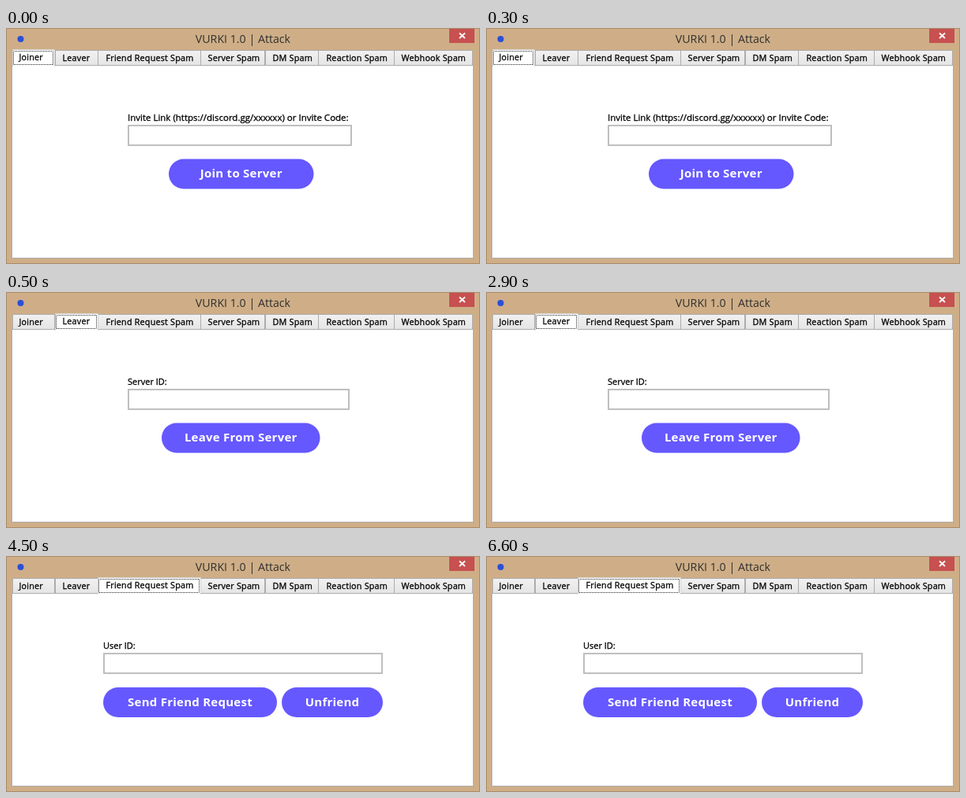
Animation, 600 px wide and 300 px high, one loop 8000 ms. Source, as an HTML page with a canvas:

```html
<!DOCTYPE html>
<html lang="en">
<head>
<meta charset="utf-8">
<title>Tabbed window</title>
<style>
  html, body { margin: 0; width: 100%; height: 100%; overflow: hidden; }
  canvas { display: block; }
</style>
</head>
<body>
<canvas id="stage" width="600" height="300"></canvas>
<script>
const ctx = document.getElementById('stage').getContext('2d');
const LOOP = 8000;
const FONT = '"Open Sans", "Noto Sans", sans-serif';
const ACCENT = '#6558ff';
const LINE = '#acacac';

// label, left edge, right edge, text x
const tabs = [
  ['Joiner', 8, 62, 16.5],
  ['Leaver', 62, 117, 71.5],
  ['Friend Request Spam', 116, 247, 126.5],
  ['Server Spam', 246, 328, 255.5],
  ['DM Spam', 328, 396, 337.5],
  ['Reaction Spam', 395, 492, 405.5],
  ['Webhook Spam', 491, 591, 500.5]
];

const pages = [
  {
    start: 0, x: 154, w: 284, size: 11.5,
    label: 'Invite Link (https://discord.gg/xxxxxx) or Invite Code:',
    buttons: [['Join to Server', 206, 166.5, 183.5]]
  },
  {
    start: 500, x: 154, w: 281, size: 11,
    label: 'Server ID:',
    buttons: [['Leave From Server', 197, 166.5, 200.5]]
  },
  {
    start: 4500, x: 123, w: 354, size: 11,
    label: 'User ID:',
    buttons: [
      ['Send Friend Request', 123, 167, 220],
      ['Unfriend', 349, 167, 128]
    ]
  }
];

function box(x, y, w, h, color) {
  ctx.fillStyle = color;
  ctx.fillRect(x, y, w, h);
}

function text(str, x, y, size, { weight = 400, color = '#000000', align = 'left', spacing = 0 } = {}) {
  ctx.font = `${weight} ${size}px ${FONT}`;
  ctx.letterSpacing = `${spacing}px`;
  ctx.textAlign = align;
  ctx.fillStyle = color;
  ctx.fillText(str, x, y);
}

// Small labels get a hairline outline for a medium weight.
function label(str, x, y, size, spacing) {
  text(str, x, y, size, { spacing });
  ctx.strokeStyle = '#000000';
  ctx.lineWidth = 0.3;
  ctx.strokeText(str, x, y);
}

function drawFrame() {
  box(0, 0, 600, 300, '#a88d6c');
  box(1, 1, 598, 298, '#cfae87');
  box(8, 28, 583, 265, '#ffffff');

  ctx.fillStyle = '#2b4fd8';
  ctx.beginPath();
  ctx.arc(18.5, 14, 4, 0, Math.PI * 2);
  ctx.fill();
  text('VURKI 1.0 | Attack', 360, 19, 14.2, { color: '#30302e', align: 'right' });

  box(561, 1, 32, 18, '#c75050');
  ctx.strokeStyle = '#ffffff';
  ctx.lineWidth = 1.8;
  ctx.beginPath();
  ctx.moveTo(574, 6.5);
  ctx.lineTo(581, 13);
  ctx.moveTo(581, 6.5);
  ctx.lineTo(574, 13);
  ctx.stroke();
}

function drawTab([name, left, right, x], selected) {
  const w = right - left;
  if (selected) {
    box(left, 27, w, 22, '#d0d0d0');
    box(left + 1, 28, w - 2, 21, '#ffffff');
    ctx.strokeStyle = '#222222';
    ctx.lineWidth = 1;
    ctx.setLineDash([1, 1]);
    ctx.lineDashOffset = 0.5;
    ctx.strokeRect(left + 1.5, 29.5, w - 4, 17);
    ctx.setLineDash([]);
  } else {
    const shade = ctx.createLinearGradient(0, 29, 0, 47);
    shade.addColorStop(0, '#f1f1f1');
    shade.addColorStop(1, '#e5e5e5');
    box(left, 28, w, 20, LINE);
    box(left + 1, 29, w - 2, 18, shade);
  }
  label(name, x, selected ? 41 : 42, 10.8, 0.2);
}

function drawPage(page) {
  label(page.label, page.x, 118, page.size, 0);
  ctx.strokeStyle = '#b9b9b9';
  ctx.lineWidth = 1.8;
  ctx.strokeRect(page.x + 1, 124, page.w - 2, 25);
  for (const [caption, left, top, width] of page.buttons) {
    ctx.fillStyle = ACCENT;
    ctx.beginPath();
    ctx.roundRect(left, top, width, 38, 19);
    ctx.fill();
    text(caption, left + width / 2, top + 23.5, 15,
      { weight: 700, color: '#ffffff', align: 'center', spacing: 0.25 });
  }
}

function draw(now) {
  const t = now % LOOP;
  const active = pages.findLastIndex(page => t >= page.start);
  drawFrame();
  ctx.strokeStyle = LINE;
  ctx.lineWidth = 1;
  ctx.strokeRect(7.5, 47.5, 584, 245);
  tabs.forEach((tab, i) => { if (i !== active) drawTab(tab, false); });
  drawTab(tabs[active], true);
  drawPage(pages[active]);
}

const begin = performance.now();
function tick() {
  draw(performance.now() - begin);
  requestAnimationFrame(tick);
}
tick();
</script>
</body>
</html>
```
